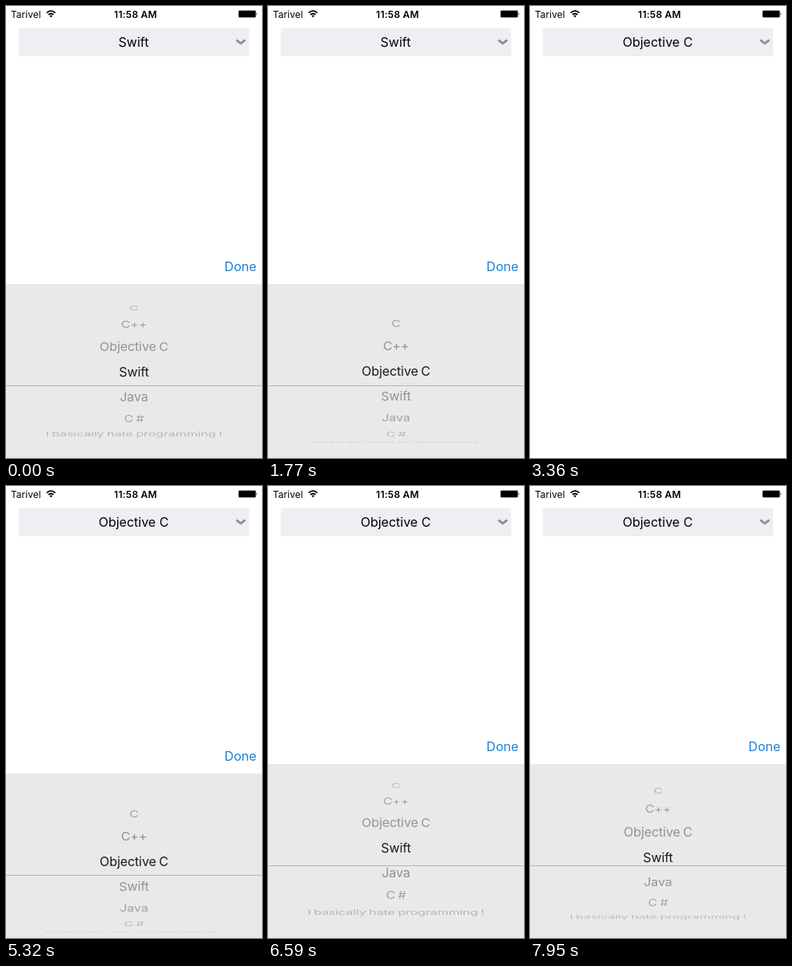
Recreate the animation shown at these times as an HTML page. Size 320 by 566 pixels, loop 8 s.

```html
<!DOCTYPE html>
<html lang="en">
<head>
<meta charset="utf-8">
<title>Language picker</title>
<style>
  html, body { margin: 0; width: 100%; height: 100%; overflow: hidden; background: #fff; }
  #stage { position: relative; width: 320px; height: 566px; overflow: hidden;
    font: 16px/20px Inter, Roboto, sans-serif; color: #000; }
  #stage div, svg { position: absolute; }
  .status { top: 0; font-size: 12px; line-height: 21px; white-space: nowrap; }
  #clock { left: 0; width: 324px; text-align: center; font-weight: 600; letter-spacing: .25px; }
  #field { left: 16px; top: 28px; width: 287px; height: 35px; line-height: 35px;
    padding-right: 1px; background: #efeef3; text-align: center; }
  #sheet { left: 0; top: 304px; width: 320px; height: 262px; background: #fff; }
  #done { right: 7px; top: 12px; color: #1a7fd6; }
  #wheel { top: 44px; width: 320px; height: 218px; background: #eae9e7; overflow: hidden;
    letter-spacing: -.1px; word-spacing: -.8px; }
  #band { top: 94px; width: 320px; height: 33px; background: #eae9e7; color: #1a1a1a;
    border-bottom: 1px solid #b5b5b3; overflow: hidden; }
  .row { left: 0; top: -10px; width: 320px; text-align: center; white-space: nowrap; }
</style>
</head>
<body>
<div id="stage">
  <div class="status" style="left:6px">Tarivel</div>
  <div class="status" id="clock">11:58 AM</div>
  <svg width="320" height="64" style="left:0;top:0;z-index:1" fill="none">
    <path d="M50.8 8.6Q56.2 3.6 61.6 8.6M53 10.9Q56.2 8 59.4 10.9" stroke="#000" stroke-width="1.8"/>
    <path d="M54.4 12.2Q56.2 10.8 58 12.2L56.2 14.2Z" fill="#000"/>
    <rect x="290.5" y="5.5" width="22" height="9" rx="1.8" stroke="#aaa"/>
    <rect x="291" y="6" width="21" height="8" rx=".8" fill="#000"/>
    <path d="M313.5 8.3Q315 10 313.5 11.7Z" fill="#000"/>
    <path d="M288 42.6L293.5 46.8L299 42.6" stroke="#858b99" stroke-width="2.8"/>
  </svg>
  <div id="field"></div>
  <div id="sheet">
    <div id="done">Done</div>
    <div id="wheel"><div id="band"></div></div>
  </div>
</div>
<script>
const LOOP = 8000;
const NAMES = ['C', 'C++', 'Objective C', 'Swift', 'Java', 'C #', 'I basically hate programming !'];
const RADIUS = 91, CENTER = 108.5, BAND_TOP = 94;
const STEP = 20.2 * Math.PI / 180, TILT = 0.95 * Math.PI / 180;

// Wheel position in rows: [ms, row]
const SCROLL = [[0, 3], [1050, 3], [1090, 3.094], [1230, 3.3], [1420, 2.75], [1600, 2.25], [1770, 2.047],
  [2140, 2.047], [2270, 2], [6100, 2], [6350, 2.6], [6590, 3.156], [6750, 3.25], [6910, 3.3],
  [7420, 3.3], [7550, 2.84], [7800, 2.84], [7950, 2.782], [LOOP, 2.782]];

const $ = id => document.getElementById(id);
const field = $('field'), sheet = $('sheet'), done = $('done'), wheel = $('wheel'), band = $('band');

function makeRow(parent, name) {
  const row = document.createElement('div');
  row.className = 'row';
  row.textContent = name;
  parent.insertBefore(row, parent === wheel ? band : null);
  return row;
}
const rows = NAMES.map(name => [makeRow(wheel, name), makeRow(band, name)]);

function track(keys, t) {
  const i = Math.max(1, keys.findIndex(k => k[0] > t));
  const [t0, a] = keys[i - 1], [t1, b] = keys[i];
  return a + (b - a) * (t - t0) / (t1 - t0);
}

function sheetOffset(t) {
  if (t < 3190) return 0;
  if (t < 3360) return 262 * ((t - 3190) / 170) ** 1.3;
  if (t < 5320) return 262;
  return 12 * Math.max(0, 1 - (t - 5320) / 770) ** 3;
}

function draw(t) {
  const pos = track(SCROLL, t);
  rows.forEach(([dim, lit], i) => {
    const angle = (i - pos) * STEP + TILT;
    const squash = Math.max(0, Math.cos(angle));
    const y = CENTER + RADIUS * Math.sin(angle);
    dim.style.opacity = 0.39 * squash ** 0.8;
    dim.style.transform = `translateY(${y}px) scaleY(${squash})`;
    lit.style.transform = `translateY(${y - BAND_TOP}px) scaleY(${squash})`;
  });
  field.textContent = NAMES[t < 2270 ? 3 : 2];
  done.style.opacity = t >= 3000 && t < 3360 ? 0.25 : 1;
  sheet.style.transform = `translateY(${sheetOffset(t)}px)`;
}

const start = performance.now();
(function tick() {
  draw((performance.now() - start) % LOOP);
  requestAnimationFrame(tick);
})();
</script>
</body>
</html>
```
